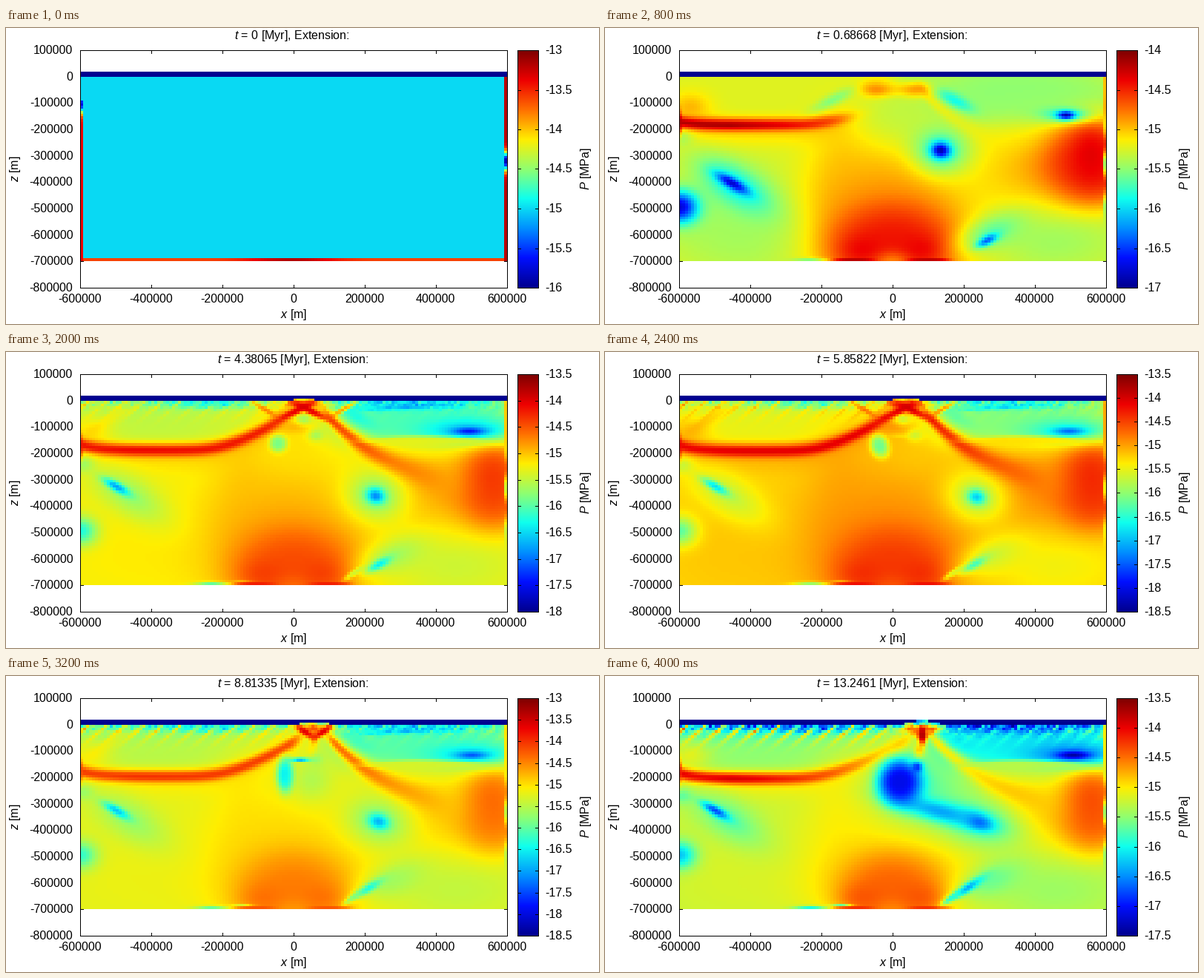
A matplotlib script for the animation above (4400 ms loop, 800 px wide and 400 px high).

```python
import numpy as np
import matplotlib.pyplot as plt
from matplotlib.animation import FuncAnimation
from matplotlib.collections import LineCollection
from matplotlib.colors import LinearSegmentedColormap

plt.rcParams.update({
    "font.family": "Liberation Sans", "font.size": 11.52,
    "mathtext.fontset": "custom", "mathtext.rm": "Liberation Sans",
    "mathtext.it": "Liberation Sans:italic", "axes.unicode_minus": False,
})

LEFT, RIGHT, TOP, BOTTOM = 100, 676, 30, 351   # plot frame, pixels
SKY, SURFACE, BASE = 59, 66, 315               # top, ground and bottom of the field
COLS, ROWS = 144, 72
CELL = (RIGHT - LEFT) / COLS

# Model ages in Myr, and the colour range in MPa at each of them
AGES = [0, 0.02165, 0.68668] + [1.42552 + 1.4775665 * k for k in (0, 1, 2, 3, 4, 5, 7, 8)]
LOWS = [-16, -17.5, -17, -17, -18, -18, -18.5, -18, -18.5, -17.5, -17.5]
HIGHS = [-13, -14, -14, -14, -13.5, -13.5, -13.5, -13, -13, -13.5, -13.5]

JET = LinearSegmentedColormap.from_list("jet9", [
    "#000090", "#000fff", "#0090ff", "#0fffee", "#90ff70",
    "#ffee00", "#ff7000", "#ee0000", "#7f0000"], N=512)

X, Y = np.meshgrid(LEFT + CELL * (np.arange(COLS) + .5),
                   SKY + (BASE - SKY) / ROWS * (np.arange(ROWS) + .5))
NOISE = np.random.default_rng(4).normal(size=X.shape)
DEPTH = np.maximum(Y - SURFACE, 0)


def ramp(t, start, end):
    return np.clip((t - start) / (end - start), 0, 1)


def bell(t, centre, width):
    return np.exp(-((t - centre) / width) ** 2)


def sigmoid(z):
    return 1 / (1 + np.exp(-np.clip(z, -50, 50)))


class Mantle:
    """Pressure in MPa, painted with soft shapes that depend on the age."""

    def __init__(self, age):
        self.p = np.full(X.shape, -15.25)
        self.age = age
        self.young = 1 - ramp(age, 0, 1.4)
        self.old = ramp(age, 1.4, 13.2)
        self.plate = ramp(age, 1.4, 4.4)
        self.active = np.sin(np.pi * self.old)
        self.axis = 388 + 40 * self.old ** .8

    def pull(self, mask, value):
        self.p += mask * (value - self.p)

    def lump(self, x, y, rx, ry, value, tilt=0, weight=1, power=1):
        c, s = np.cos(np.radians(tilt)), np.sin(np.radians(tilt))
        a = ((X - x) * c + (Y - y) * s) / rx
        b = ((Y - y) * c - (X - x) * s) / ry
        self.pull(weight * np.exp(-np.minimum((a * a + b * b) ** power, 60)), value)

    def streak(self, x0, y0, x1, y1, width, value, weight=1):
        tilt = np.degrees(np.arctan2(y1 - y0, x1 - x0))
        self.lump((x0 + x1) / 2, (y0 + y1) / 2, np.hypot(x1 - x0, y1 - y0) / 2,
                  width, value, tilt, weight, 1.5)

    def spot(self, x, y, rx, ry, core, halo, tilt=0, spread=3):
        self.lump(x, y, rx * spread, ry * spread, halo, tilt, .95)
        self.lump(x, y, rx, ry, core, tilt)

    def regions(self):
        young, plate = self.young, self.plate
        self.lump(190, 262, 115, 75, -15.18 - .5 * young, power=1.5)
        self.lump(385, 215, 120, 72, -15.02, power=1.5)
        self.lump(530, 215, 85, 50, -15.18)
        self.lump(605, 285, 90, 45, -15.45)
        self.lump(190, 95, 165, 48, -15.5 + .52 * young, power=2)
        self.lump(560, 90, 150, 42, -15.5 - .55 * plate, power=2)
        self.lump(322, 185, 42, 75, -15, weight=.8)
        self.lump(395, 115, 50, 45, -15.1 - .5 * young, weight=.75)
        self.lump(115, 107, 28, 20, -15.05 + .3 * young, weight=.8)
        self.lump(150, 85, 52, 7, -15, -33, .6 * self.active)
        self.lump(405, 70, 28, 9, -16, weight=young)
        self.lump(565, 129, 95, 15, -15.3, power=4, weight=.85 * plate)

    def heat(self):
        young, old = self.young, self.old
        self.lump(605, 190, 88, 50, -14.87, weight=.9)
        self.lump(660, 181, 52 + 20 * np.exp(-self.age / 2), 59, -14.45, power=1.6)
        self.lump(655, 172, 22, 34, -14.3, weight=.7)
        self.lump(387, 285, 112, 88 - 24 * old, -14.77, power=1.4)
        self.lump(387, 298, 82 - 13 * old, 57, -14.44, power=1.7)
        self.lump(388, 315, 29, 13, -14.6 - .5 * young, weight=.9)
        for side in (-1, 1):
            self.lump(387 + 40 * side, 299, 25, 17, -14.34, weight=.7)
            self.lump(386 + 51 * side, 314, 28, 2, -14.2, power=2)
        self.lump(277, 314, 22, 3, -16, weight=1 - young)
        self.lump(318, 310, 13, 2, -15.7, weight=old)

    def slabs(self):
        young, old, active = self.young, self.old, self.active
        climb = np.logaddexp(0, (X - 270) / 18) * 18 / 145
        rise = (76 - 20 * old) * (1 - young)
        path = 131 + 8 * old - rise * climb ** 1.5 - 8 * (1 - young) * np.exp((LEFT - X) / 22)
        path = np.maximum(path, 76)
        end = 278 * young + (368 + 42 * old) * (1 - young)
        fade = sigmoid((end - X) / (5 + 11 * young))
        far = -14.65 + .6 * active - .2 * young
        core = -14.15 + .28 * old + (far + 14.15 - .28 * old) * ramp(X, 170, 370)
        halo = np.exp(-((Y - path) / np.where(Y > path, 24, 13)) ** 2)
        self.pull(.75 * halo * fade, -14.9)
        self.pull(np.exp(-np.abs((Y - path) / (8 - young)) ** 2.2) * fade, core)

        start = 424 + 14 * old
        run = np.maximum(X - start, 0)
        arm = 79 + 120 * (1 - np.exp(-run / 105))
        reach = sigmoid((X - start) / 4) * sigmoid((500 + 105 * self.plate - X) / 15)
        warm = -14.65 + .6 * active + ramp(run, 0, 180) * (-.2 - .6 * active)
        self.pull((1 - young) * (.65 + .25 * self.plate) * reach
                  * np.exp(-((Y - arm) / (9 + .08 * run)) ** 2), warm)

    def cold_spots(self):
        young, old, plate = self.young, self.old, self.plate
        drift = 1 - np.exp(-self.age / 1.5)
        self.spot(424 + 79 * drift, 147 + 50 * drift, 12 + 7 * old ** 3, 10,
                  -16.9, -15.85, 17 * drift)
        settle = np.exp(-self.age / .7)
        bx, by = 149 + 61 * settle, 182 + 75 * settle
        self.lump(bx + 18 - 28 * young, by + 12 - 18 * young, 56, 26, -15.72 - .45 * young, 32, .95)
        self.lump(bx, by, 20 + 6 * young, 6 + 2 * young, -16.8, 30)
        self.spot(101, 242, 22, 19, -16.25 - young, -15.25 - young, spread=2.4 * young + .1)
        self.lump(104, 148 + 14 * old, 16, 11, -15.85, weight=.7 * (1 - young))
        # lower right, with a thin tail
        self.lump(523, 276, 44, 22, -15.68, -22, .9)
        self.lump(518 - 30 * ramp(self.age, 0, 9), 287, 15 + 12 * old, 6, -16.4, -27 - 6 * old)
        self.streak(456, 308, 482, 290, 4, -15.9, old ** .5)
        # upper right plate, cut off sharply below
        ex, ey = 622 + 10 * old, 117 - 11 * plate
        self.lump(ex, ey, 34 + 26 * plate, 10 + 6 * plate, -15.9 - .75 * plate, weight=.95)
        self.lump(ex, ey + 1, 11 + 9 * plate, 5, -16.9 - .5 * plate)
        self.lump(565, 120, 88, 6, -15.3, power=3, weight=.85 * plate)
        # wedges beside the axis
        wedge = (1 - young) * bell(self.age, 1.4, 2)
        self.lump(308, 97, 32, 8, -16, -27, wedge)
        self.lump(472, 98 - 11 * plate, 28, 9, -16.3, 28, (1 - young) * (1 - .6 * old))
        # plume below the axis, feeding the sinking spot when old
        late = ramp(self.age, 8.8, 13.2)
        grow = ramp(self.age, 3, 8.8)
        self.lump(425, 150, 62, 48, -15.8, weight=.85 * late)
        self.lump(452, 183, 60, 14, -16.4, 14, late)
        self.lump(364 + 13 * grow + 21 * late, 120 + 14 * grow + 9 * late,
                  12 + 19 * late, 8 + 16 * grow + 8 * late, -16.6 - .5 * late,
                  -40 * (1 - grow), grow ** .5, 1.6)
        self.lump(412, 140, 28, 30, -15.75, weight=.65 * bell(self.age, 9, 2))
        self.lump(418, 112, 10, 8, -15.8, weight=.75 * plate)
        self.lump(397, 113, 13, 2.5, -17.2, weight=bell(self.age, 9, 2))
        self.lump(421, 123, 7, 7, -16.9, weight=late)

    def crust(self):
        old, plate = self.old, self.plate
        self.lump(275, 70, 65, 7, -16.6, weight=.65 * plate)
        self.lump(545, 71, 90, 7, -16.9, weight=.55 * plate)
        self.lump(535, 75, 55, 2.5, -17.2, -4, .6 * self.active)
        # parallel faults on the left, fainter on the right
        bright = bell(((X + 1.15 * Y) / 25) % 1, .5, .17)
        side = sigmoid((375 - X) / 8) + .35 * sigmoid((X - 470) / 10)
        self.p += old * side * bell(DEPTH, 0, 19) * (1.4 * bright - .5)
        self.pull(.85 * old * bell(DEPTH, 0, 5) * (1 - .7 * bright), -16.8)
        self.p += .28 * old ** .5 * NOISE * np.exp(-(DEPTH / 11) ** 2)

    def ridge(self):
        axis, old, plate = self.axis, self.old, self.plate
        early = (1 - self.young) * bell(self.age, 1.4, 2)
        self.lump(388, 77, 48, 15, -14.8, weight=early, power=2)
        cross = bell(self.age, 5, 2)
        self.lump(390, 101, 22, 9, -14.85, weight=.8 * cross)
        self.lump(402, 90, 10, 8, -15.8, weight=.9 * cross)
        vee = bell(self.age, 9.8, 3.3)
        for side in (-1, 1):
            self.lump(393 + 28 * side, 84, 20, 10, -14.5, weight=early)
            self.streak(axis + 34 * side, 92, axis - 17 * side, 66, 5, -13.95, cross)
            self.streak(402 + 72 * side, 66, 402 + 34 * side, 89, 3.5, -14.6, .9 * cross)
            self.streak(axis + 26 * side, 65, axis, 84, 5, -13.4, vee)
        self.lump(axis, 70, 24, 5, -13.95, weight=.75 * plate)
        stem = ramp(self.age, 6, 12)
        self.lump(axis, 80, 6, 14, -13.7, weight=stem, power=1.5)
        self.lump(axis - 4, 100, 7, 10, -14.7, weight=.8 * stem)

    def edges(self):
        rim = -14.95 + .6 * np.cos(2 * np.pi * (Y - 155) / 57) * bell(Y, 183, 48)
        self.pull(.9 * (X > RIGHT - CELL), rim - .4 * ramp(Y, 225, 240))
        self.pull(.7 * (X < LEFT + CELL) * bell(Y, 128, 14), -14.2)

    def pressure(self):
        for paint in (self.regions, self.heat, self.slabs, self.cold_spots,
                      self.crust, self.ridge, self.edges):
            paint()
        # air above the ground, pierced by the growing ridge
        swell = 6 * self.old ** .6 * bell(X, self.axis, 20)
        return np.where(Y < SURFACE - swell, -99, self.p)


def initial_pressure():
    p = np.full(X.shape, -15.0)
    p[-1] = -13.6 + .42 * bell(X[-1], 385, 60)
    y = Y[:, 0]
    p[:, 0] = np.where(y < 98, -15, -13.4 - 2.3 * bell(y, 103, 12))
    p[:, -1] = -13.2 - 2.7 * bell(y, 180, 13)
    p[Y < SURFACE] = -99
    return p


fig = plt.figure(figsize=(8, 4), dpi=100, facecolor="white")
ax = fig.add_axes([0, 0, 1, 1])
ax.axis("off")


def strokes(lines, z):
    """One-pixel lines; points name the pixel they run through."""
    marks = LineCollection(np.array(lines, float).reshape(-1, 2, 2) + .5, colors="black",
                           linewidths=.72, capstyle="projecting", snap=False, zorder=z)
    return ax.add_collection(marks)


def box(x0, y0, x1, y1):
    corners = [(x0, y0), (x1, y0), (x1, y1), (x0, y1)]
    strokes([(corners[i - 1], corners[i]) for i in range(4)], 4)


def picture(data, x0, x1, y0, y1):
    return ax.imshow(data, cmap=JET, vmin=0, vmax=1, zorder=2, aspect="auto",
                     interpolation="nearest", extent=(x0, x1, y1, y0))


image = picture(np.zeros(X.shape), LEFT, RIGHT, SKY, BASE)
picture(np.linspace(1, 0, 321)[:, None], 690, 719, TOP, BOTTOM)
ax.set_xlim(0, 800)
ax.set_ylim(400, 0)

ticks = []
for i in range(7):
    x = LEFT + 96 * i
    ticks += [[(x, BOTTOM), (x, BOTTOM - 4)], [(x, TOP), (x, TOP + 4)]]
    ax.text(x - .5, 371, str(200000 * (i - 3)), ha="center", va="baseline")
for i in range(10):
    y = round(TOP + i * 321 / 9)
    ticks += [[(LEFT, y), (LEFT + 4, y)], [(RIGHT, y), (RIGHT - 4, y)]]
    ax.text(90.5, y + 5, str(100000 * (1 - i)), ha="right", va="baseline")
strokes(ticks, 1)
box(LEFT, TOP, RIGHT, BOTTOM)
box(690, TOP, 718, BOTTOM)

ax.text(388.5, 392, "$x$ [m]", ha="center", va="baseline")
ax.text(12, 190, "$z$ [m]", ha="center", va="center", rotation=90)
ax.text(783, 190, "$P$ [MPa]", ha="center", va="center", rotation=90)
title = ax.text(0, 15, "", va="baseline")
bar_ticks = strokes([], 3)
bar_labels = [ax.text(727, 0, "", va="baseline") for _ in range(12)]


def draw(frame):
    age, low, high = AGES[frame], LOWS[frame], HIGHS[frame]
    pressure = Mantle(age).pressure() if frame else initial_pressure()
    image.set_data(np.clip((pressure - low) / (high - low), 0, 1))
    title.set_text(f"$t$ = {age:g} [Myr], Extension:")
    title.set_x(285 if frame else 308)
    marks = []
    for i, label in enumerate(bar_labels):
        value = low + i / 2
        label.set_visible(value <= high)
        if value <= high:
            y = round(BOTTOM - 321 * (value - low) / (high - low))
            label.set_text(f"{value:g}")
            label.set_y(y + 5)
            marks += [[(690, y), (694, y)], [(718, y), (714, y)]]
    bar_ticks.set_segments(np.array(marks) + .5)
    return [image, title, bar_ticks, *bar_labels]


animation = FuncAnimation(fig, draw, frames=len(AGES), interval=400,
                          repeat=True, repeat_delay=0, blit=False)
plt.show()
```
